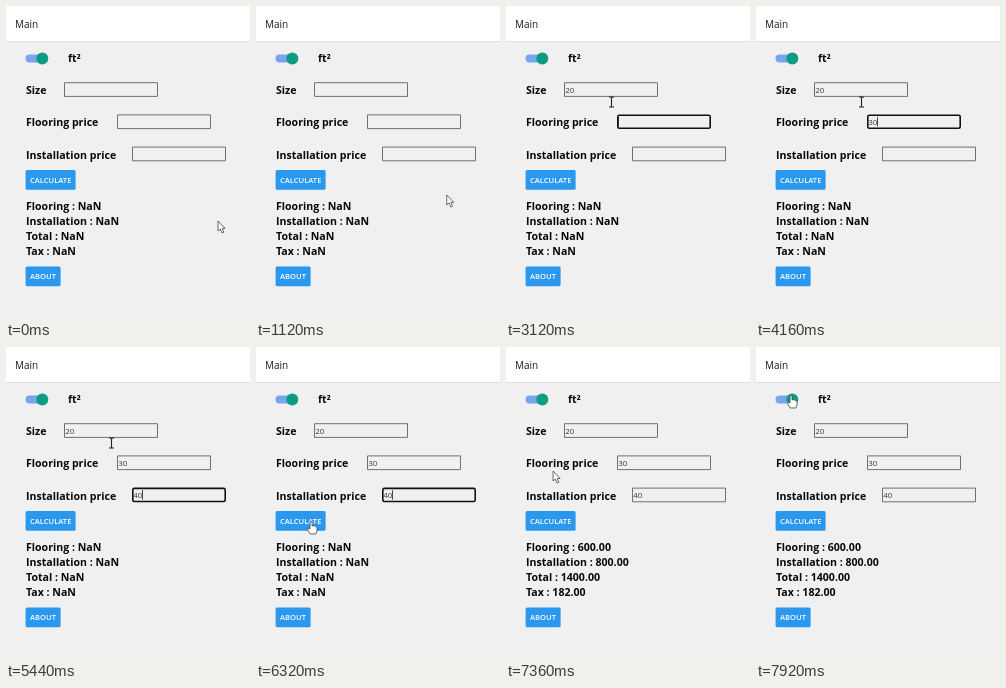
These frames come from a looping animation (244x313 px, 8000 ms). An HTML page with a canvas:

```html
<!DOCTYPE html>
<html lang="en">
<head>
<meta charset="utf-8">
<title>Main</title>
<style>
html, body { margin: 0; width: 100%; height: 100%; overflow: hidden; background: #f0f0f0; }
canvas { display: block; width: 244px; height: 313px; }
</style>
</head>
<body>
<canvas id="stage"></canvas>
<script>
const W = 244, H = 313, LOOP = 8000;
const FONT = '"Open Sans", "Noto Sans", sans-serif';
const canvas = document.getElementById('stage');
const ctx = canvas.getContext('2d');
const dpr = window.devicePixelRatio || 1;
canvas.width = W * dpr;
canvas.height = H * dpr;

// keys: times at which each character of the value is typed
const FIELD_W = 94, FIELD_H = 14.7;
const fields = [
  { label: 'Size', x: 58, y: 76.2, value: '20', focus: 1680, blur: 2960, keys: [2240, 2400] },
  { label: 'Flooring price', x: 111, y: 108.4, value: '30', focus: 2960, blur: 4560, keys: [3440, 3680] },
  { label: 'Installation price', x: 126, y: 140.6, value: '40', focus: 4560, blur: 6520, keys: [5000, 5160] }
];
const PRESS = 6520, RELEASE = 6680;

// time, x, y of the pointer's hot spot
const path = [
  [0, 212, 215], [960, 212, 215], [1520, 106, 85], [1760, 106, 85], [1920, 106, 97],
  [2720, 105.5, 96], [5680, 105.5, 96], [6240, 55, 174], [7120, 55, 174],
  [7680, 35, 48], [LOOP, 35, 48]
];

const clamp = v => Math.max(0, Math.min(1, v));
const ease = v => v * v * (3 - 2 * v);

function pointerAt(t) {
  let i = 0;
  while (i < path.length - 2 && t >= path[i + 1][0]) i++;
  const [t0, x0, y0] = path[i], [t1, x1, y1] = path[i + 1];
  const k = ease(clamp((t - t0) / (t1 - t0)));
  return [x0 + (x1 - x0) * k, y0 + (y1 - y0) * k];
}

function text(s, x, y, size, weight, color) {
  ctx.font = `${weight} ${size}px ${FONT}`;
  ctx.fillStyle = color;
  ctx.fillText(s, x, y);
}

const label = (s, y, x = 20) => text(s, x, y, 10.6, 700, '#080808');

function box(x, y, w, h, r) {
  ctx.beginPath();
  ctx.roundRect(x, y, w, h, r);
}

function button(s, y, w, alpha) {
  ctx.globalAlpha = alpha;
  ctx.fillStyle = '#2a98ee';
  box(19.6, y, w, 19.7, 1.5);
  ctx.fill();
  text(s, 24, y + 12.6, 7.6, 600, '#fff');
  ctx.globalAlpha = 1;
}

function field(f, t) {
  label(f.label, Math.round(f.y) + 12);
  const focused = t >= f.focus && t < f.blur;
  const line = focused ? 1.6 : 1;
  ctx.strokeStyle = focused ? '#101010' : '#707070';
  ctx.lineWidth = line;
  box(f.x + line / 2, f.y + line / 2, FIELD_W - line, FIELD_H - line, focused ? 1.5 : 0);
  ctx.stroke();

  const typed = f.keys.filter(k => t >= k);
  const value = f.value.slice(0, typed.length);
  text(value, f.x + 1.3, f.y + 10.6, 8, 400, '#383838');
  if (!focused) return;
  const since = t - (typed.length ? typed[typed.length - 1] : f.focus);
  if (since % 1060 < 530) {
    ctx.fillStyle = '#222';
    ctx.fillRect(f.x + 1 + ctx.measureText(value).width, f.y + 2.5, 0.8, 9.5);
  }
}

function toggle() {
  ctx.fillStyle = '#78a6ee';
  box(19.5, 48.5, 22, 8, 4);
  ctx.fill();
  ctx.fillStyle = '#0c9c83';
  ctx.beginPath();
  ctx.arc(36.3, 52.5, 6, 0, 7);
  ctx.fill();
}

const arrow = new Path2D('M0 0V10L2.3 8L4 12L5.8 11.2L4.1 7.4H7Z');
const hand = new Path2D('M-1 1Q0-1 1 1V5Q2 4 3 5Q4 4.5 4.7 5.5Q6 5 6 7V10L4.8 13H-.8L-3.6 8.4Q-3.8 6.5-1.8 7.4L-1 8.2Z');
const beam = new Path2D('M-2.5-5H-.7L0-4.4L.7-5H2.5M0-4.4V4.4M-2.5 5H-.7L0 4.4L.7 5H2.5');

function pointerShape(x, y) {
  const onButton = x > 20 && x < 70 && y > 164 && y < 184;
  const onToggle = x > 19 && x < 43 && y > 46 && y < 59;
  if (onButton || onToggle) return hand;
  const onField = fields.some(f => x > f.x && x < f.x + FIELD_W && y > f.y && y < f.y + FIELD_H);
  const besideSize = x > 100 && x < 110 && y > 90 && y < 100;
  return onField || besideSize ? beam : arrow;
}

function pointer(t) {
  const [x, y] = pointerAt(t);
  const shape = pointerShape(x, y);
  ctx.save();
  ctx.translate(x, y);
  ctx.lineJoin = 'round';
  ctx.lineWidth = shape === beam ? 1.1 : 0.8;
  ctx.strokeStyle = shape === beam ? '#222' : '#444';
  if (shape !== beam) {
    ctx.fillStyle = '#fff';
    ctx.fill(shape);
  }
  ctx.stroke(shape);
  ctx.restore();
}

function buttonAlpha(t) {
  if (t < PRESS) return 1;
  if (t < RELEASE) return 1 - 0.8 * ease(clamp((t - PRESS) / 120));
  return 0.2 + 0.8 * ease(clamp((t - RELEASE) / 250));
}

function draw(t) {
  ctx.setTransform(dpr, 0, 0, dpr, 0, 0);
  ctx.fillStyle = '#f0f0f0';
  ctx.fillRect(0, 0, W, H);
  ctx.fillStyle = '#fff';
  ctx.fillRect(0, 0, W, 35);
  ctx.fillStyle = '#dedede';
  ctx.fillRect(0, 35, W, 1);
  text('Main', 9, 22, 10, 500, '#1c1c1e');

  toggle();
  label('ft²', 56, 62);
  fields.forEach(f => field(f, t));
  button('CALCULATE', 164, 50, buttonAlpha(t));

  const done = t >= RELEASE;
  const [size, floor, install] = fields.map(f => +f.value);
  const sum = size * (floor + install);
  const rows = [
    ['Flooring', size * floor], ['Installation', size * install],
    ['Total', sum], ['Tax', sum * 0.13]
  ];
  rows.forEach(([name, v], i) =>
    label(`${name} : ${done ? v.toFixed(2) : 'NaN'}`, 204 + 15 * i));

  button('ABOUT', 260.5, 35, 1);
  pointer(t);
}

function tick() {
  draw(performance.now() % LOOP);
  requestAnimationFrame(tick);
}
tick();
</script>
</body>
</html>
```
